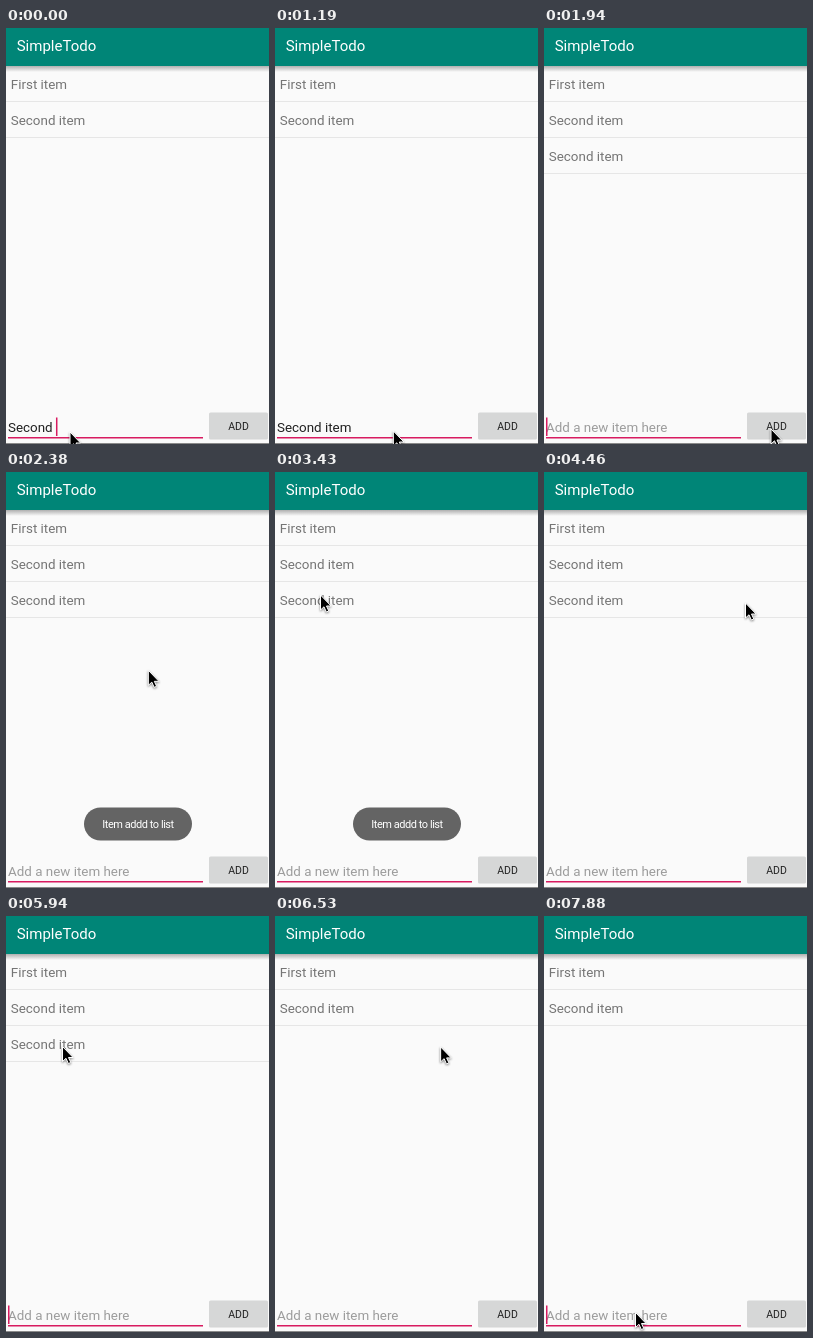
Recreate the animation shown at these times as an HTML page. Size 263 by 416 pixels, loop 8 s.

```html
<!DOCTYPE html>
<html lang="en">
<head>
<meta charset="utf-8">
<title>SimpleTodo</title>
<style>
  html, body { margin: 0; height: 100%; overflow: hidden; background: #fafafa; }
  svg { display: block; font: 13.4px Roboto, sans-serif; }
  text { white-space: pre; }
  .item { fill: #757575; }
  .title { font-size: 15px; fill: #fff; }
  .button { font-size: 10.5px; fill: #212121; text-anchor: middle; }
  .toast { font-size: 11px; letter-spacing: -.46px; fill: #fff; text-anchor: middle; }
  #pointer { filter: drop-shadow(0 1px 1px #0007); }
</style>
</head>
<body>
<svg width="263" height="416" viewBox="0 0 263 416">
  <defs>
    <linearGradient id="shadow" x2="0" y2="1">
      <stop stop-opacity=".3"/>
      <stop offset="1" stop-opacity="0"/>
    </linearGradient>
  </defs>
  <rect width="263" height="416" fill="#fafafa"/>
  <rect y="38" width="263" height="6" fill="url(#shadow)"/>
  <rect width="263" height="38" fill="#008577"/>
  <text class="title" x="10.7" y="23">SimpleTodo</text>

  <path d="M0 73.5H263M0 109.5H263" stroke="#e6e6e6"/>
  <text class="item" x="4.8" y="61">First item</text>
  <text class="item" x="4.8" y="97">Second item</text>
  <g id="third">
    <rect id="press" y="110" width="263" height="35" opacity="0"/>
    <path d="M0 145.5H263" stroke="#e6e6e6"/>
    <text class="item" x="4.8" y="133">Second item</text>
  </g>

  <text id="input" x="2" y="404" fill="#212121"></text>
  <text id="hint" x="2" y="404" fill="#9c9c9c">Add a new item here</text>
  <rect x="2" y="409" width="195" height="1.5" fill="#d81b60"/>
  <rect id="caret" y="389.5" width="1.5" height="18.5" fill="#d81b60"/>
  <rect x="203" y="385.5" width="59" height="26" rx="1.5" opacity=".15"/>
  <rect x="203" y="384.5" width="59" height="26" rx="1.5" fill="#d6d7d7"/>
  <text class="button" x="232.5" y="402">ADD</text>
  <path d="M0 415.5H263" stroke="#8a8a8a"/>

  <g id="toast">
    <rect x="78" y="335.5" width="108" height="33" rx="16.5" fill="#646464"/>
    <text class="toast" x="132" y="356">Item addd to list</text>
  </g>
  <path id="pointer" d="M0 0V15L3.5 11.8L5.8 17L8.3 16L6 11H10.6Z" stroke="#fff"/>
</svg>
<script>
const LOOP = 8000, TICK = 148.3, BLINK = 500;
const ADDED = 13, REMOVED = 43;   // ticks at which the third row comes and goes

// Input edits: tick and number of letters shown.
const edits = [[0, 7], [2, 8], [3, 9], [5, 11], [ADDED, 0]];

// Pointer moves: first tick, last tick, destination.
const home = [64, 404];
const moves = [
  [6, 12, 227, 401],
  [14, 17, 100, 97],
  [18, 21, 45.5, 123],
  [27, 30, 201.5, 131],
  [33, 37, 56.5, 130.5],
  [41, 45, 202, 131],
  [49, 53, 91.5, 396.5]
];

const $ = id => document.getElementById(id);
const clamp = v => Math.min(1, Math.max(0, v));
const show = (id, opacity) => $(id).setAttribute('opacity', opacity);
const within = (tick, from, to) => tick >= from && tick < to;

function pointerAt(tick) {
  let [x, y] = home;
  for (const [from, to, toX, toY] of moves) {
    const p = clamp((tick - from) / (to - from));
    x += (toX - x) * p;
    y += (toY - y) * p;
  }
  return [x, y];
}

function draw(now) {
  const tick = Math.floor(now % LOOP / TICK);
  const [edited, letters] = edits.findLast(([start]) => start <= tick);
  const blinks = Math.floor(((tick - edited) * TICK + 75) / BLINK);
  const pressed = within(tick, 26, 28) || within(tick, 41, REMOVED);

  $('input').textContent = 'Second item'.slice(0, letters);
  $('caret').setAttribute('x', 2 + $('input').getComputedTextLength());
  show('caret', 1 - blinks % 2);
  show('hint', letters ? 0 : 1);
  show('third', within(tick, ADDED, REMOVED) ? 1 : 0);
  show('press', pressed ? .08 : 0);
  show('toast', clamp(Math.min(tick - ADDED, 29 - tick) / 2));
  $('pointer').setAttribute('transform', `translate(${pointerAt(tick)})`);
  requestAnimationFrame(draw);
}
draw(performance.now());
</script>
</body>
</html>
```
